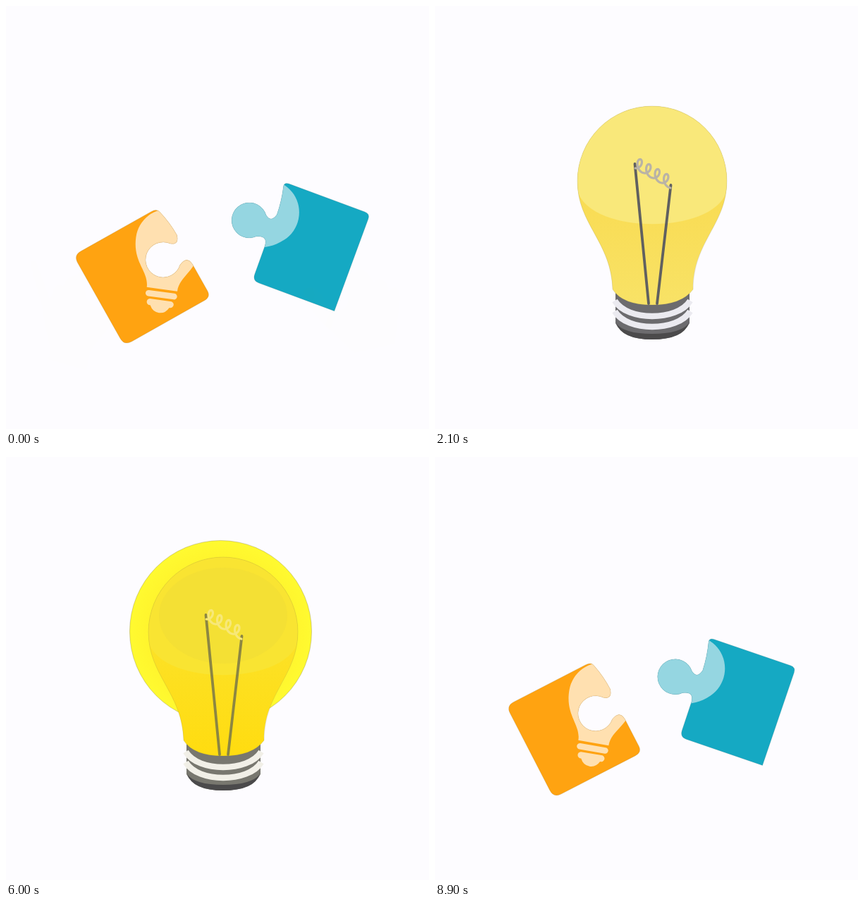
Recreate the animation shown at these times as an HTML page with a canvas. Size 600x600 px, loop 9000 ms.

```html
<!DOCTYPE html>
<html lang="en">
<head>
<meta charset="utf-8">
<title>Puzzle to light bulb</title>
<style>
html, body { margin: 0; width: 100%; height: 100%; overflow: hidden; background: #fdfcff; }
canvas { display: block; width: 600px; height: 600px; }
</style>
</head>
<body>
<canvas id="stage" width="600" height="600"></canvas>
<script>
const ctx = document.getElementById('stage').getContext('2d');
const LOOP = 9000, BG = '#fdfcff';
const path = d => new Path2D(d);
const clamp = v => Math.max(0, Math.min(1, v));
const ramp = (t, a, b) => clamp((t - a) / (b - a));
const smooth = u => u * u * (3 - 2 * u);
const mix = (a, b, u) => a + (b - a) * u;

// Value at time t from a list of [time, value] points.
function key(t, points) {
  let i = 0;
  while (i < points.length - 2 && t > points[i + 1][0]) i++;
  const [t0, a] = points[i], [t1, b] = points[i + 1], u = ramp(t, t0, t1);
  return Array.isArray(a) ? a.map((v, n) => mix(v, b[n], u)) : mix(a, b, u);
}
const channels = hex => [0, 2, 4].map(i => parseInt(hex.substr(i, 2), 16));
const colorKeys = points => {
  const list = points.map(([t, hex]) => [t, channels(hex)]);
  return t => `rgb(${key(t, list).map(Math.round)})`;
};

function fill(p, color) { ctx.fillStyle = color; ctx.fill(p); }
function line(p, color, width) {
  ctx.strokeStyle = color;
  ctx.lineWidth = width;
  ctx.stroke(p);
}
function disc(x, y, r, color, edge) {
  const p = new Path2D();
  p.arc(x, y, r, 0, 7);
  fill(p, color);
  if (edge) line(p, edge, 0.8);
}
function group(alpha, draw) {
  if (alpha <= 0) return;
  ctx.save();
  ctx.globalAlpha *= alpha;
  draw();
  ctx.restore();
}

// Puzzle pieces, described in their joined position.
const JOINT = 'Q323 321 323 341 Q319 355 309 347 A25 25 0 1 0 306 380 Q321 373 322 388 V431 ';
const left = {
  x: 251, y: 367, dx: -58.5, dy: 16, turn: -29.4, color: '#ffa311', light: '#ffe0b0',
  shape: path('M193 294 H308 Q317 294 318 301 ' + JOINT + 'Q322 441 311 441 H193 Q181 441 181 429 V306 Q181 294 193 294Z'),
  back() {
    fill(path('M121 276 Q126 267 131 276 L122 331 L132 322 Q141 315 147 324 Q158 314 169 320 Q178 317 181 323 V334 Q169 344 168 357 Q171 375 183 380 V406 Q150 417 136 424 L117 446 L76 404 Q86 399 88 390 Q95 365 107 332Z'), '#d29b64');
    line(path('M132 331 Q138 319 147 324 M151 335 Q159 324 171 327 M162 341 Q169 331 181 331'), '#b9824e', 1);
    for (let i = 0; i < 4; i++)
      disc(70 + i * 14, 403 + i * 12.3, 5.5, i ? '#ead7b7' : '#fff', '#d5c7b2');
  },
  front() {
    fill(path('M180 379 Q195 379 206 368 Q218 359 228 364 Q235 370 225 379 Q209 398 180 407Z'), '#d29b64');
    fill(path('M214 376 Q217 363 228 364 Q235 370 224 379 Q217 381 214 376Z'), '#dfb987');
  }
};
const right = {
  x: 384, y: 368, dx: 48.5, dy: -26, turn: 19.8, color: '#15a9c3', light: '#95d6e1',
  shape: path('M318 299 ' + JOINT + 'Q322 441 332 441 L446 442 L447 303 Q447 295 439 295 L324 294 Q318 294 318 299Z'),
  back() {
    fill(path('M493 489 L497 499 L523 547 L562 520 L556 461 L551 453 L542 458Z'), BG);
    line(path('M493 489 L497 499 M542 458 L551 453 L556 462'), '#d3d0d3', 0.8);
    disc(515, 507, 3.5, BG, '#c9c6c9');
    disc(527, 522, 3.5, BG, '#c9c6c9');
    fill(path('M440 381 Q452 386 455 378 Q463 369 475 377 Q480 380 484 384 Q489 373 502 379 Q507 384 509 389 Q514 376 523 384 Q528 391 530 402 L543 457 L493 489 L440 466 V439 Q461 441 459 424 Q455 408 444 400Z'), '#fdb062');
    line(path('M484 384 L487 391 M509 389 L511 396'), '#d98f48', 1);
  },
  front() {
    fill(path('M394 431 Q399 419 411 421 Q425 425 432 437 Q438 441 450 438 V470 Q430 463 414 451 Q400 441 394 431Z'), '#fdb062');
    fill(path('M394 431 Q399 419 407 422 Q415 430 413 440 Q409 442 405 440Z'), '#d8b47c');
  }
};

// Flat bulb, upright around the centre of its head.
const icon = path('M-24 75 C-24 50 -51 40 -51 0 A51 51 0 0 1 51 0 C51 40 24 50 24 75Z' +
  'M-20 79 H20 A4.7 4.7 0 0 1 20 88.5 H-20 A4.7 4.7 0 0 1 -20 79Z' +
  'M-17 92 H17 A5 5 0 0 1 15 102 Q10 112 0 112 Q-10 112 -15 102 A5 5 0 0 1 -17 92Z');
const MARK = { x: 308, y: 343, size: 0.91, angle: 37 };
function drawIcon(x, y, size, angle, color, edge) {
  ctx.save();
  ctx.translate(x, y);
  ctx.rotate(angle * Math.PI / 180);
  ctx.scale(size, size);
  fill(icon, color);
  if (edge) line(icon, edge, 0.7 / size);
  ctx.restore();
}

function drawPiece(p, apart, lift, size, hand, marked) {
  ctx.save();
  ctx.translate(p.x + p.dx * apart, p.y + p.dy * apart + lift);
  ctx.rotate(p.turn * apart * Math.PI / 180);
  ctx.scale(size, size);
  ctx.translate(-p.x, -p.y);
  group(hand, p.back);
  fill(p.shape, p.color);
  if (marked) {
    ctx.save();
    ctx.clip(p.shape);
    drawIcon(MARK.x, MARK.y, MARK.size, MARK.angle, p.light);
    ctx.restore();
    line(p.shape, 'rgba(110,110,110,.25)', 0.6);
  }
  group(hand, p.front);
  ctx.restore();
}

function drawPuzzle(t) {
  const ending = t >= 8000;
  let apart, lift, size = 1, alpha = 1;
  if (ending) {
    apart = 1 - Math.pow(1 - ramp(t, 8100, 9000), 1.2);
    lift = 54 * (1 - apart);
    size = mix(0.6, 1, smooth(ramp(t, 8000, 8300)));
    alpha = ramp(t, 7950, 8200);
  } else {
    const u = ramp(t, 150, 950);
    apart = 1 - smooth(u);
    lift = -32 * Math.sin(Math.PI * u);
    alpha = 1 - ramp(t, 1250, 1650);
  }
  const hand = ending ? 0 : ramp(t, 0, 400);
  group(alpha, () => {
    for (const p of [left, right]) drawPiece(p, apart, lift, size, hand, ending || t < 950);
  });
}

function drawRisingIcon(t) {
  const up = smooth(ramp(t, 950, 1200)), grow = smooth(ramp(t, 1200, 1750));
  group(mix(0.6, 1, ramp(t, 950, 1080)), () =>
    drawIcon(mix(mix(MARK.x, 322, up), 308, grow), mix(mix(MARK.y, 270, up), 248, grow),
      mix(mix(MARK.size, 1, up), 2.08, grow), mix(MARK.angle, 0, grow), '#fff', '#cfcdd0'));
}

// Large bulb
const glass = path('M202 248 A106 106 0 0 1 414 248 C414 310 366 334 366 402 Q350 424 308 424 Q266 424 252 402 C250 334 202 310 202 248Z');
const dome = path('M203 265 C225 324 391 324 413 265 L430 130 H180Z');
const base = path('M256 403 V450 Q267 473 308 473 Q349 473 361 450 V403 Q350 423 308 423 Q266 423 256 403Z');
const cap = path('M257 450 Q268 465 308 465 Q348 465 360 450 Q352 473 308 473 Q265 473 257 450Z');
const stems = path('M303 422 L283.5 224 M315 422 L334.5 254');
const coil = new Path2D();
for (let i = 0; i <= 120; i++) {
  const u = i / 120, a = u * 8 * Math.PI;
  coil.lineTo(284 + 50 * u + 6 * Math.sin(a), 222 + 28 * u + 8 * Math.cos(a));
}

const domeColor = colorKeys([[1750, 'ffffff'], [2100, 'f9e87a'], [3000, 'ffea32'], [4500, 'ffec30'], [6000, 'f9e432'], [7000, 'ffea32'], [7800, 'e8e8db']]);
const neckTop = colorKeys([[1750, 'ffffff'], [2100, 'f9dc53'], [3000, 'ffe52a'], [6000, 'fce126'], [7000, 'ffe52a'], [7800, 'e7e7da']]);
const neckLow = colorKeys([[1750, 'ffffff'], [2100, 'f8e266'], [3000, 'ffde12'], [7000, 'ffdc10'], [7800, 'e8e8dc']]);
const stemColor = colorKeys([[2100, '606060'], [3000, 'a29a48'], [4500, 'a59c45'], [6000, '8c8642'], [7000, '9a9348'], [7800, '777777']]);
const coilColor = colorKeys([[2100, 'b9b3a6'], [3000, 'fff078'], [6000, 'f7e878'], [7000, 'fff078'], [7800, 'fadf92']]);
const bandColor = colorKeys([[2100, 'ebeaf0'], [3000, 'f3f1e2'], [7000, 'f0efe8'], [7800, 'ebeaf0']]);
const baseColor = colorKeys([[2100, '6c6b6e'], [3000, '7b7970'], [7000, '77766f'], [7800, '6c6b6e']]);
const glowSize = [[2100, 98], [2400, 108], [3000, 124], [3600, 127.5], [4000, 135], [4500, 138], [5000, 135], [6000, 129], [6600, 144], [7000, 142], [7700, 98]];

function drawGlow(t) {
  if (t < 2100 || t > 7700) return;
  const r = key(t, glowSize), g = ctx.createRadialGradient(304.5, 247, 60, 304.5, 247, r);
  g.addColorStop(0, '#ffec28');
  g.addColorStop(1, '#fffa30');
  disc(304.5, 247.5, r, g, 'rgba(120,110,60,.4)');
}

function drawBulb(t) {
  drawGlow(t);
  const g = ctx.createLinearGradient(0, 270, 0, 424);
  g.addColorStop(0, neckTop(t));
  g.addColorStop(1, neckLow(t));
  fill(base, baseColor(t));
  fill(cap, '#4b4a4b');
  for (const y of [0, 15])
    line(path(`M255 ${418 + y} C264 ${433 + y} 286 ${440 + y} 308 ${440 + y} S353 ${433 + y} 362 ${418 + y}`), bandColor(t), 8.5);
  fill(glass, g);
  ctx.save();
  ctx.clip(glass);
  fill(dome, domeColor(t));
  group(key(t, [[5000, 0], [6000, 0.2], [6600, 0]]), () => {
    const inner = new Path2D();
    inner.ellipse(308, 225, 91, 68, 0, 0, 7);
    fill(inner, '#dfca3c');
  });
  ctx.restore();
  line(glass, 'rgba(120,115,80,.3)', 0.6);
  ctx.lineCap = 'round';
  line(stems, stemColor(t), 3.8);
  line(coil, coilColor(t), 3.2);
}

function render(t) {
  ctx.globalAlpha = 1;
  ctx.fillStyle = BG;
  ctx.fillRect(0, 0, 600, 600);
  if (t < 1650 || t >= 8000) drawPuzzle(t);
  if (t >= 950 && t < 2000) drawRisingIcon(t);
  if (t >= 1750 && t < 8200) {
    const size = key(t, [[7900, 1], [8000, 0.63], [8200, 0.3]]);
    group(ramp(t, 1750, 2000) * (1 - ramp(t, 7950, 8200)), () => {
      ctx.translate(308, 340);
      ctx.scale(size, size);
      ctx.translate(-308, -340);
      drawBulb(t);
    });
  }
}

const start = performance.now();
function tick() {
  render((performance.now() - start) % LOOP);
  requestAnimationFrame(tick);
}
tick();
</script>
</body>
</html>
```
